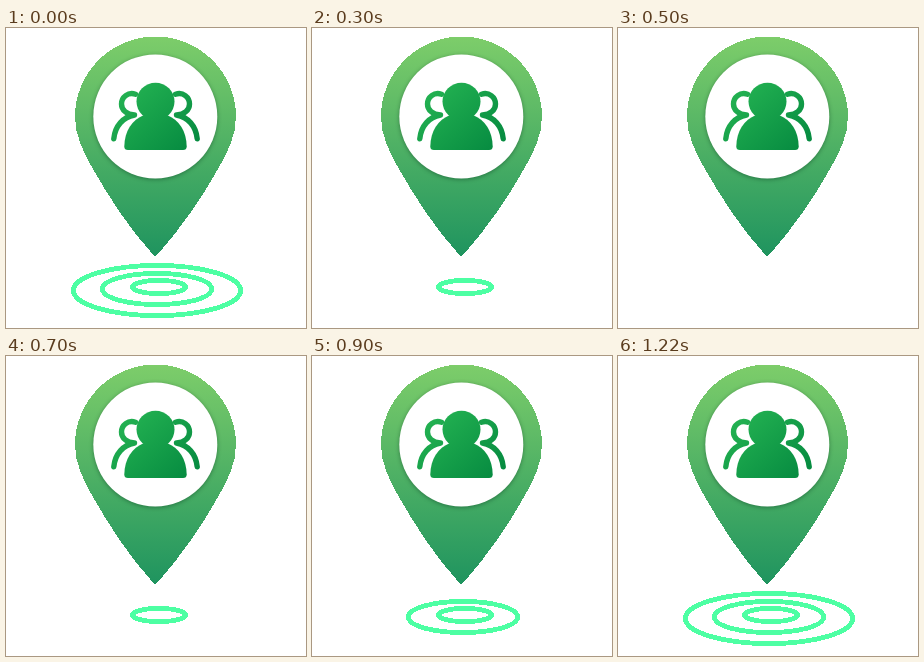
These frames come from a looping animation (300x300 px, 1300 ms). An HTML page:

```html
<!DOCTYPE html>
<html lang="en">
<head>
<meta charset="utf-8">
<title>Map pin with pulsing rings</title>
<style>
  html, body { margin: 0; width: 100%; height: 100%; overflow: hidden; background: #fff; }
  svg { display: block; width: 300px; height: 300px; }
  .crisp { shape-rendering: crispEdges; }
  .badge { filter: drop-shadow(0 1.5px 2px rgba(0, 40, 20, 0.4)); }
  .ring { fill: none; stroke: #4dffa3; stroke-width: 4.8; }
  .side { fill: none; stroke-width: 5.4; stroke-linecap: round; stroke-linejoin: round; }
</style>
</head>
<body>
<svg viewBox="0 0 300 300">
  <defs>
    <linearGradient id="pinFill" gradientUnits="userSpaceOnUse" x1="0" y1="9" x2="0" y2="228">
      <stop offset="0" stop-color="#7dcd6a"/>
      <stop offset="1" stop-color="#1f945f"/>
    </linearGradient>
    <linearGradient id="peopleFill" gradientUnits="userSpaceOnUse" x1="118" y1="58" x2="176" y2="124">
      <stop offset="0" stop-color="#24b352"/>
      <stop offset="1" stop-color="#078c41"/>
    </linearGradient>
  </defs>

  <path class="crisp" fill="url(#pinFill)" d="M69 89
    A80.5 80.5 0 0 1 230 89
    C230 107 221.5 125 212 141
    C195 171 175 200 152 226
    Q149.2 229.5 146.5 226
    C123 200 104 171 87 141
    C77.5 125 69 107 69 89Z"/>
  <circle class="badge" cx="149.3" cy="88.4" r="62" fill="#fff"/>

  <g fill="url(#peopleFill)" stroke="none">
    <g class="side" stroke="url(#peopleFill)">
      <path d="M129.5 66.2 C122 63.8 115.5 69 115.5 76 C115.5 82 120.5 86.5 128.5 87 C117 89 109 98 107.8 110.8"/>
      <path d="M169.5 66.2 C177 63.8 183.5 69 183.5 76 C183.5 82 178.5 86.5 170.5 87 C182 89 190 98 191.2 110.8"/>
    </g>
    <ellipse cx="149.5" cy="73.5" rx="19" ry="18.7"/>
    <path d="M138 87 C126 92 118.5 103 118.3 118.5 Q118.3 122 122 122
      H177 Q180.7 122 180.7 118.5 C180.5 103 173 92 161 87Z"/>
  </g>

  <g class="crisp">
    <ellipse class="ring" cx="153" cy="259" rx="26.6" ry="6.6"/>
    <ellipse class="ring" cx="151" cy="261" rx="54.6" ry="15.6"/>
    <ellipse class="ring" cx="151" cy="262.5" rx="83.6" ry="25.1"/>
  </g>
</svg>
<script>
const LOOP = 1300;
const STEP = 200;
const FIRST = 100;
const rings = document.querySelectorAll('.ring');

// Rings vanish from the outside in, then return in reverse order
function ringCount(time) {
  const step = Math.floor((time - FIRST) / STEP) + 1;
  return Math.abs(rings.length - step);
}

function draw(time) {
  const count = ringCount(time);
  rings.forEach((ring, i) => {
    ring.style.visibility = i < count ? 'visible' : 'hidden';
  });
}

const start = performance.now();
function tick() {
  draw((performance.now() - start) % LOOP);
  requestAnimationFrame(tick);
}
tick();
</script>
</body>
</html>
```
